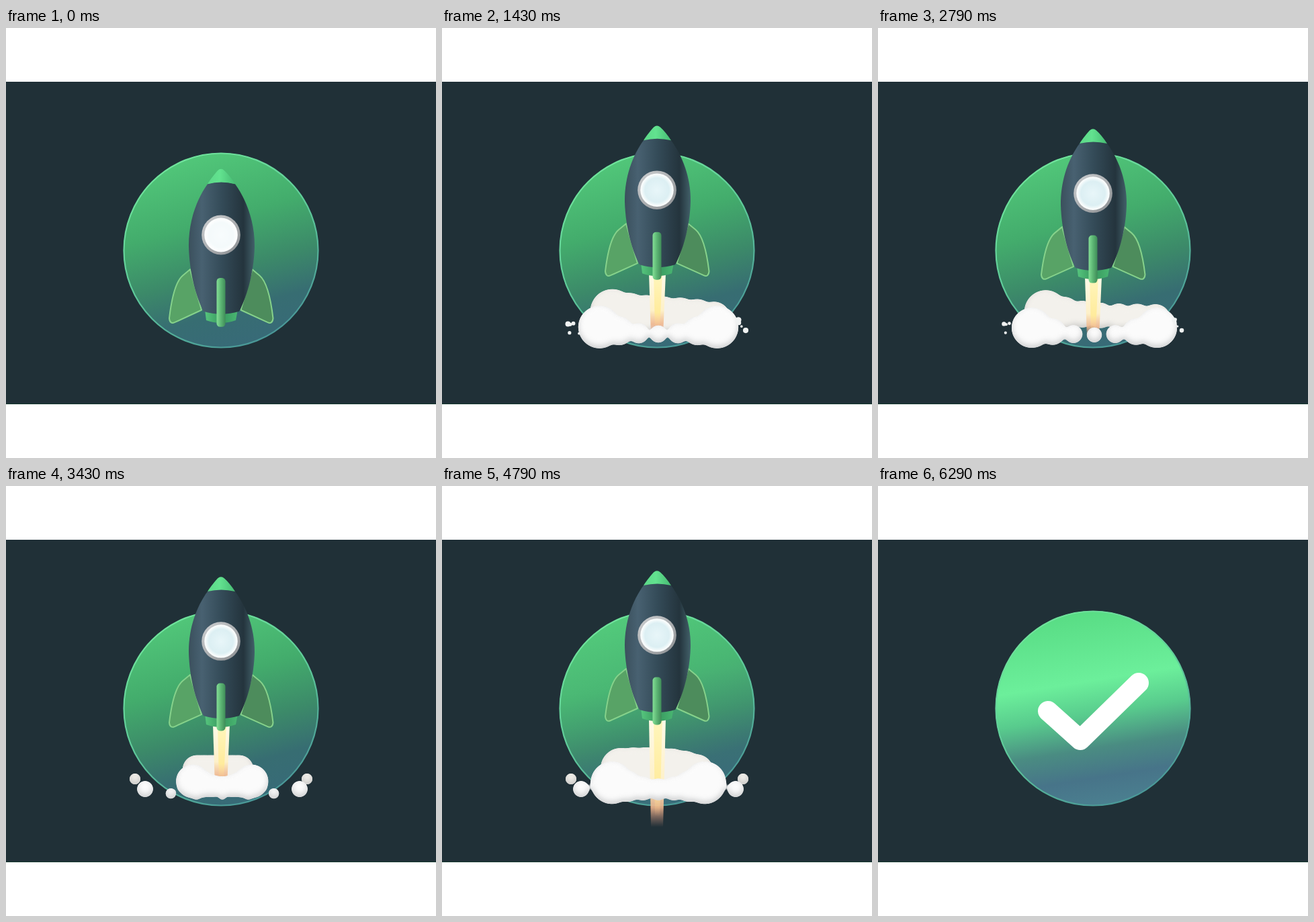
Animation, 640 px wide and 640 px high, one loop 6.37 s. Source, as an HTML page:

```html
<!DOCTYPE html>
<html lang="en">
<head>
<meta charset="utf-8">
<title>Rocket launch</title>
<style>
  html, body { margin: 0; width: 100%; height: 100%; overflow: hidden; background: #fff; }
  svg { display: block; width: 100vw; height: 100vh; }
</style>
</head>
<body>
<svg viewBox="0 0 640 640">
  <defs>
    <clipPath id="scene"><rect y="80" width="640" height="480"/></clipPath>
    <linearGradient id="disc" x1=".36" y1="0" x2=".64" y2="1">
      <stop offset="0" stop-color="#52c87a"/>
      <stop offset=".35" stop-color="#43ac6c"/>
      <stop offset=".6" stop-color="#3c8a69"/>
      <stop offset=".8" stop-color="#376d72"/>
      <stop offset="1" stop-color="#386a78"/>
    </linearGradient>
    <linearGradient id="bright" x1=".42" y1="0" x2=".58" y2="1">
      <stop offset="0" stop-color="#58dc84"/>
      <stop offset=".36" stop-color="#6cef9b"/>
      <stop offset=".53" stop-color="#58cb8d"/>
      <stop offset=".7" stop-color="#4a8c82"/>
      <stop offset=".85" stop-color="#477489"/>
      <stop offset="1" stop-color="#4b8090"/>
    </linearGradient>
    <linearGradient id="rim" x1=".2" y1="0" x2=".7" y2="1">
      <stop offset="0" stop-color="#72e69c"/>
      <stop offset=".5" stop-color="#5fcb9a"/>
      <stop offset="1" stop-color="#489497"/>
    </linearGradient>
    <linearGradient id="body">
      <stop offset="0" stop-color="#3b505d"/>
      <stop offset=".2" stop-color="#486171"/>
      <stop offset=".5" stop-color="#344b58"/>
      <stop offset=".83" stop-color="#24343d"/>
      <stop offset="1" stop-color="#426069"/>
    </linearGradient>
    <linearGradient id="nose">
      <stop offset="0" stop-color="#5cd889"/>
      <stop offset=".45" stop-color="#62e28f"/>
      <stop offset="1" stop-color="#46bb73"/>
    </linearGradient>
    <linearGradient id="nozzle">
      <stop offset="0" stop-color="#56c67e"/>
      <stop offset=".5" stop-color="#38985e"/>
      <stop offset="1" stop-color="#49b672"/>
    </linearGradient>
    <linearGradient id="keel">
      <stop offset="0" stop-color="#84df96"/>
      <stop offset=".45" stop-color="#5fb976"/>
      <stop offset="1" stop-color="#3f8c58"/>
    </linearGradient>
    <linearGradient id="ring" x1="0" y1="0" x2="1" y2="1">
      <stop offset="0" stop-color="#cfd1d3"/>
      <stop offset="1" stop-color="#8b8e91"/>
    </linearGradient>
    <radialGradient id="glass">
      <stop offset="0" stop-color="#e8f6f9"/>
      <stop offset=".8" stop-color="#dceff3"/>
      <stop offset="1" stop-color="#f3fafb"/>
    </radialGradient>
    <linearGradient id="fire" x1="0" y1="0" x2="0" y2="1">
      <stop offset="0" stop-color="#fffae8"/>
      <stop offset=".6" stop-color="#fdf0c8"/>
      <stop offset=".82" stop-color="#eeb58c" stop-opacity=".9"/>
      <stop offset="1" stop-color="#c98a7c" stop-opacity="0"/>
    </linearGradient>
    <linearGradient id="core" x1="0" y1="0" x2="0" y2="1">
      <stop offset="0" stop-color="#fff6bd"/>
      <stop offset=".7" stop-color="#ffeb9c"/>
      <stop offset="1" stop-color="#f9c088" stop-opacity="0"/>
    </linearGradient>
    <!-- Merges neighbouring balls and shades their lower edge -->
    <filter id="goo" filterUnits="userSpaceOnUse" x="160" y="360" width="320" height="140" color-interpolation-filters="sRGB">
      <feGaussianBlur stdDeviation="3.5"/>
      <feColorMatrix values="1 0 0 0 0  0 1 0 0 0  0 0 1 0 0  0 0 0 14 -3.5" result="blob"/>
      <feGaussianBlur in="blob" stdDeviation="4.5"/>
      <feOffset dy="-4" result="lit"/>
      <feFlood flood-color="#8b8f92" flood-opacity=".4"/>
      <feComposite in2="blob" operator="in"/>
      <feComposite in2="lit" operator="out" result="shade"/>
      <feMerge><feMergeNode in="blob"/><feMergeNode in="shade"/></feMerge>
    </filter>
    <path id="fin" d="M274 358 L263 367 C251 377 246 404 243 429 Q244 438 251 435 L291 417 Z"
      stroke="#86d28b" stroke-width="2" stroke-linejoin="round"/>
  </defs>

  <rect width="640" height="640" fill="#fff"/>
  <g clip-path="url(#scene)">
    <rect y="80" width="640" height="480" fill="#203037"/>
    <rect y="559" width="640" height="1" fill="#163a30"/>
    <circle cx="320" cy="331" r="145" fill="url(#disc)"/>
    <circle id="glow" cx="320" cy="331" r="145" fill="url(#bright)"/>
    <circle cx="320" cy="331" r="144.5" fill="none" stroke="url(#rim)" stroke-width="2.2"/>

    <path id="check" d="M253 335 L301 378 L388 293" pathLength="1" fill="none" stroke="#fff"
      stroke-width="30" stroke-linecap="round" stroke-linejoin="round"/>

    <g id="rear" fill="#f3f1ec" filter="url(#goo)"></g>

    <g id="flame">
      <path d="M308 0 H333 L329 1 H311 Z" fill="url(#fire)"/>
      <path d="M315 0 H328 L324 .9 H317 Z" fill="url(#core)"/>
    </g>

    <g id="rocket">
      <use href="#fin" fill="#58a366"/>
      <use href="#fin" fill="#4d8c5c" transform="matrix(-1 0 0 1 640.5 0)"/>
      <path d="M296 416 L298 432 Q320 440 342 432 L345 416 Z" fill="url(#nozzle)"/>
      <path d="M300 234 C283 257 271.5 290 272 325 C273 365 284 401 294 419 Q320 427 347 419 C357 401 369 365 370 325 C370.5 290 358 257 341 234 Q320 228 300 234 Z" fill="url(#body)"/>
      <path d="M300 234 C305 226 311 219 315 214.5 Q320 210 325 214.5 C330 219 336 226 341 234 Q320 229 300 234 Z" fill="url(#nose)"/>
      <circle cx="320" cy="308" r="28.8" fill="url(#ring)"/>
      <circle cx="320" cy="308" r="24.8" fill="#f8fbfb"/>
      <circle cx="320" cy="308" r="22.5" fill="url(#glass)"/>
      <circle id="shine" cx="320" cy="308" r="24" fill="#fff"/>
      <rect x="313.5" y="370.5" width="13" height="71" rx="5" fill="url(#keel)"/>
    </g>

    <g id="front" fill="#fbfbfb" filter="url(#goo)"></g>
    <g id="spray" fill="#f0f2f2"></g>
  </g>
</svg>
<script>
const LOOP = 6370;
const PUFFS = [670, 1950, 3230, 4290];
const LIFE = 1950;
const LIFTOFF = 4640;
const BALLS = 7;
const el = id => document.getElementById(id);

const clamp = v => Math.min(1, Math.max(0, v));
const ramp = (t, a, b) => clamp((t - a) / (b - a));
const mix = (a, b, k) => a + (b - a) * k;
const blend = (a, b, k) => a.map((v, i) => mix(v, b[i], k));
const wave = k => (1 - Math.cos(Math.PI * k)) / 2;
const hump = k => k > 0 && k < 1 ? Math.sin(Math.PI * k) : 0;
const rand = n => Math.abs(Math.sin(n * 127.1 + 3.7) * 43758.5) % 1;
const dot = (x, y, r) => r > 0.3
  ? `<circle cx="${x.toFixed(2)}" cy="${y.toFixed(2)}" r="${r.toFixed(2)}"/>` : '';

// Poses [x, y, radius] of the ball at u, from -1 (left) to 1 (right)
const frontPoses = u => [
  [322 + 50 * u, 447 - 9 * u * u, 15 + 11 * u * u],
  [322 + 103 * u, 459 - 11 * u * u, 7 + 17 * u * u],
  [322 + 115 * u, 463 - 12 * u * u, 3.5 + 7 * u * u]
];
const rearPoses = u => [
  [315 + 36 * u, 418, 22],
  [335 + 92 * u, 430 + 7 * u, (22 - 5 * u) * u * u],
  [320 + 128 * u, 436, 7 * u ** 6]
];

// A puff swells from the jet, spreads into a ring, then shrinks to drops
function ballAt([puff, ring, drop], age) {
  if (age < 230) return blend([320, 450, 4], puff, age / 230);
  if (age < 980) return blend(puff, ring, (age - 230) / 750);
  return blend(ring, drop, wave(ramp(age, 1000, 1400)));
}

function smoke(t) {
  let front = '', rear = '', spray = '';
  PUFFS.forEach((birth, n) => {
    const age = t - birth;
    if (age < 0 || age > LIFE) return;
    const last = n === PUFFS.length - 1;
    const size = 1 - (last ? ramp(t, 5400, 5780) : ramp(age, LIFE - 200, LIFE));
    const swell = hump((age - 330) / 650);
    for (let i = 0; i < BALLS; i++) {
      const u = 2 * i / (BALLS - 1) - 1;
      const [x, y, r] = ballAt(frontPoses(u), age);
      front += dot(x, y, r * (1 + 0.25 * swell) * size);
      const [bx, by, br] = ballAt(rearPoses(u), age);
      rear += dot(bx, by, (br * (1 + 0.25 * swell) + 20 * swell * (1 - u * u)) * size);
    }
    const fling = hump((age - 560) / 400);
    for (let i = 0; i < 10; i++) {
      const side = i % 2 ? 1 : -1;
      spray += dot(320 + side * (116 + 17 * rand(i)), 433 + 22 * rand(i + 20), (1.5 + 3 * rand(i + 40)) * fling);
    }
  });
  el('front').innerHTML = front;
  el('rear').innerHTML = rear;
  el('spray').innerHTML = spray;
}

// Lift, hover, then a short dip before the rocket shoots off
function height(t) {
  if (t < 950) return -77 * wave(t / 950);
  const hover = -61.75 - 15.25 * Math.cos(2 * Math.PI * (Math.min(t, LIFTOFF) - 950) / 2450);
  return hover + 6 * hump((t - LIFTOFF) / 160) - 500 * ramp(t, LIFTOFF + 20, 5120) ** 2;
}

function draw(t) {
  const y = height(t);
  const power = ramp(t, 80, 480);
  const stretch = 1.025 - 0.025 * ramp(t, 0, 500);
  const length = 92 * power + 70 * ramp(t, 4540, 4700) + Math.sin(t / 45) * power;
  el('rocket').style.display = el('flame').style.display = t < 5140 ? '' : 'none';
  el('rocket').setAttribute('transform', `translate(0 ${y + 308}) scale(1 ${stretch}) translate(0 -308)`);
  el('flame').setAttribute('transform', `translate(0 ${y + 432}) scale(1 ${Math.max(length, 0.01)})`);
  el('flame').style.opacity = ramp(t, 80, 200);
  el('shine').style.opacity = 0.7 * (1 - ramp(t, 0, 600));
  el('glow').style.opacity = 0.6 * ramp(t, LIFTOFF, 5200) + 0.4 * ramp(t, 5290, 6100);

  const drawn = wave(ramp(t, 5210, 5850));
  el('check').style.display = drawn > 0 ? '' : 'none';
  el('check').setAttribute('stroke-dasharray', `${drawn} 2`);
  smoke(t);
}

const start = performance.now();
function tick() {
  draw((performance.now() - start) % LOOP);
  requestAnimationFrame(tick);
}
tick();
</script>
</body>
</html>
```
